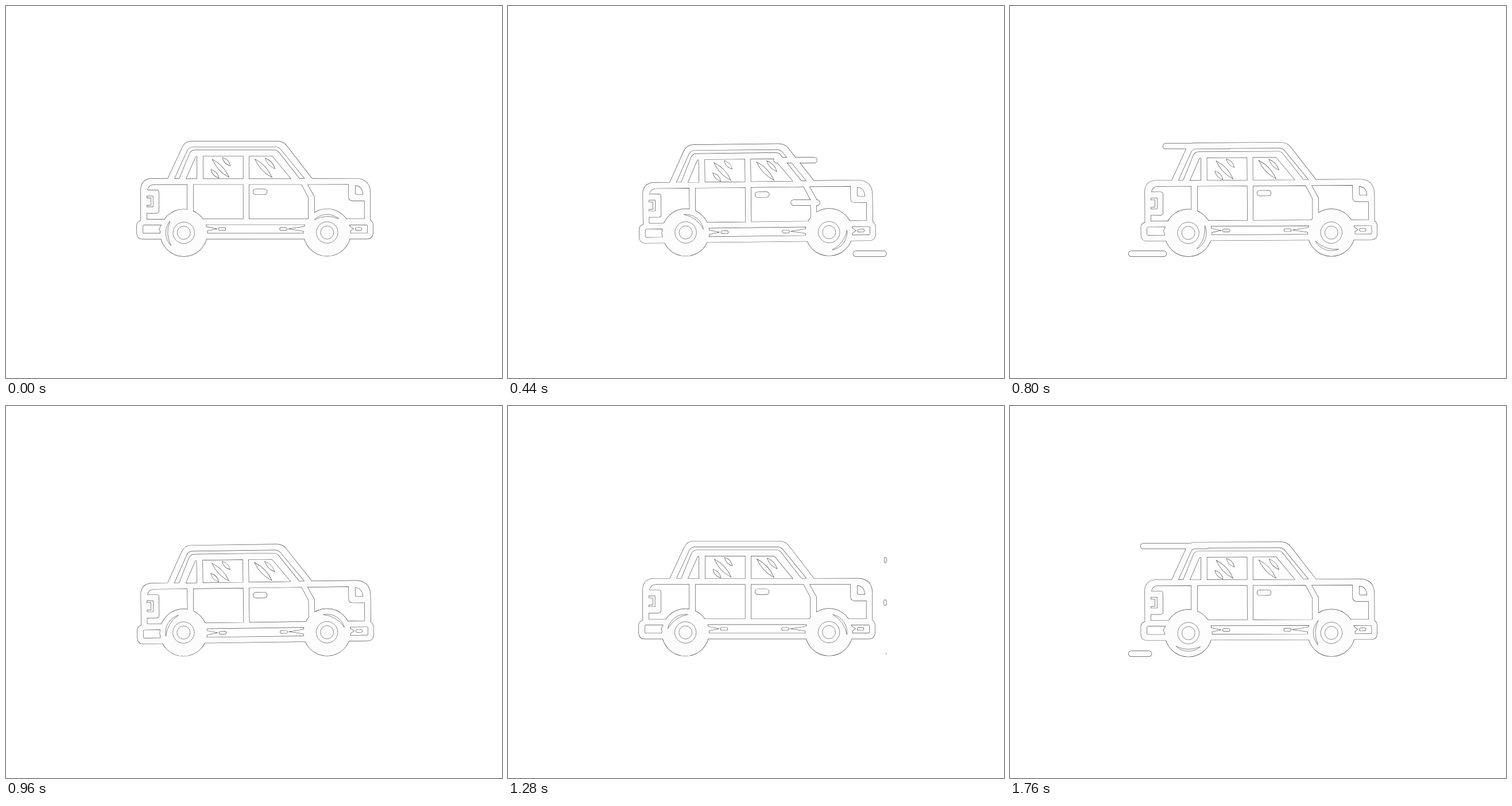
These frames come from a looping animation (864x648 px, 1800 ms). An HTML page with a canvas:

```html
<!DOCTYPE html>
<html lang="en">
<head>
<meta charset="utf-8">
<title>Driving car</title>
<style>
html, body { margin: 0; width: 100%; height: 100%; overflow: hidden; background: #fff; }
canvas { display: block; }
</style>
</head>
<body>
<canvas id="stage" width="864" height="648"></canvas>
<script>
const ctx = document.getElementById('stage').getContext('2d');
const LOOP = 1800, STEP = 40, PASS = 940;
const INK = '#484848', FILL = '#fcfcfc', PAPER = '#fff', EDGE = 0.65;
const LEFT = 206.5, RIGHT = 659;
const TAU = Math.PI * 2;

// The silhouette, then its openings; details inside an opening are solid again (even-odd).
const outline = 'M323 235H472Q483 235 489 243L533 300H610Q634 301 634.5 325V373Q639 375 639 381V396Q638 405 629 405H238Q229 405 228 396V381Q228 375 235 373V318Q236 301 254 300H282L307 246Q312 235 323 235Z';
const openings = [
  'M293 300L315 252Q318 244.500 326 244.500H469Q475 244.500 479 249L520.500 300H511L475 254Q472 250.500 467 250.500H329Q323 250.500 320 256L302 300Z',
  'M313 300.500L330 262Q333 259 333 263V300.500Z',
  'M343 260.500H413.500V300.500H343Z',
  'M423 260.500H464L497 300.500H423Z',
  'M246 320Q248 310 258 310H316V371H245V360H262Q266 360 266 356V324Q266 320 262 320Z',
  'M245 330H256.500V349.500H245V346H252V334H245Z',
  'M326 310H413.500V370.500H326Z',
  'M423 310H515L527 333V370.500H423Z',
  'M525 310H597V332Q597 338.500 604 338.500H624.500V370.500H537V332Z',
  'M608 312Q621 312 622 328H611Q608 328 608 325Z',
  'M240 380.500H271L267 388L271 395.500H240Q238 395.500 238 393V383Q238 380.500 240 380.500Z',
  'M598 380.500H628Q630 380.500 630 383V393Q630 395.500 628 395.500H598Z',
  'M340 380H527V395.500H340Z'
];
const spikes = 'M342 382.500L366 387.500L342 392.500ZM526 382.500L494 387.500L526 392.500ZM598.500 383L605 387.500L598.500 392Z';

const body = new Path2D(outline + openings.join('') + spikes);
const pills = [[430.5, 318.5, 24, 9], [370.5, 385.5, 12, 4.4], [477, 385.5, 12, 4.4], [608.5, 385.5, 11, 4.4]];
for (const [x, y, w, h] of pills) body.roundRect(x, y, w, h, h / 2);

// Lens-shaped reflections: centre, half length, half width.
const glints = [[374, 282, 20.5, 3.6], [384, 270.5, 9.5, 2.8], [364, 291.5, 9.5, 2.8], [448.5, 282, 21, 3.6], [460, 273.5, 12, 2.8]];
for (const [x, y, a, b] of glints) {
  const lens = new Path2D(`M${-a} 0Q0 ${-2 * b} ${a} 0Q0 ${2 * b} ${-a} 0Z`);
  body.addPath(lens, new DOMMatrix().translate(x, y).rotate(47));
}

const ease = (t, start, span) => {
  const p = Math.min(1, Math.max(0, (t - start) / span));
  return (1 - Math.cos(Math.PI * p)) / 2;
};
const across = p => RIGHT - (RIGHT - LEFT) * p;

// Each streak gives its front and back end at a time within the second pass.
const streaks = [
  { y: 244, ends: t => slide(t, 1539.5, 1.95, 119) },
  { y: 268.5, ends: t => slide(t, 1279, 1.925, 75) },
  { y: 342.5, ends: t => slide(t, 1278.5, 1.62, 50) },
  { y: 431.5, ends: t => [across(ease(t, 1273, 460)), across(ease(t, 1475, 353))] }
];
function slide(t, start, speed, length) {
  const front = 657.5 - (t - start) * speed;
  return [front, front + length];
}

function addStreaks(path, t) {
  for (const { y, ends } of streaks) {
    const [a, b] = ends(t).map(x => Math.min(RIGHT, Math.max(LEFT, x)));
    const w = b - a, h = Math.min(9, w * 2.8);
    if (w > 0.1) path.roundRect(a, y - h / 2, w, h, Math.min(w, h) / 2);
  }
}

function disc(x, y, r) {
  const path = new Path2D();
  path.arc(x, y, r, 0, TAU);
  return path;
}

function paint(path, color) {
  ctx.fillStyle = color;
  ctx.fill(path, 'evenodd');
}

function edge(path, width) {
  ctx.strokeStyle = INK;
  ctx.lineWidth = width;
  ctx.stroke(path);
}

function drawRim(x, y, angle) {
  const r = 31.5, half = 0.75, end = angle - half;
  const shine = new Path2D();
  shine.arc(x, y, r, end, angle + half);
  shine.quadraticCurveTo(x + 33 * Math.cos(angle), y + 33 * Math.sin(angle),
    x + r * Math.cos(end), y + r * Math.sin(end));
  const parts = [[shine, PAPER], [disc(x, y, 18.7), PAPER], [disc(x, y, 11.5), FILL]];
  for (const [path, color] of parts) {
    paint(path, color);
    edge(path, EDGE);
  }
}

function draw(now) {
  let t = Math.floor((now % LOOP) / STEP) * STEP;
  const first = t < STEP;
  if (first) t += 32; // the loop restarts slightly ahead

  const bob = (1 - Math.cos(TAU * (t - 65) / 600)) / 2;
  const pose = new DOMMatrix()
    .translate(400, 315.5 + 6.5 * bob)
    .rotate(-0.78 * bob)
    .translate(-400, -315);
  const car = new Path2D();
  car.addPath(body, pose);

  const spin = (139 + 1.2 * t) * Math.PI / 180;
  const dx = 0.9 * Math.cos(spin - 1.2), dy = 0.7 * Math.sin(spin);
  const wheels = [[310 + dx, 395 + dy, spin], [559.5 + dx / 2, 394.5 + dy, spin + Math.PI / 2]];

  const lines = new Path2D();
  addStreaks(lines, t);
  addStreaks(lines, t + PASS);
  if (first) addStreaks(lines, t + LOOP);

  // Inked shapes first, then all fills, so that only the joint outline stays.
  const shapes = [car, ...wheels.map(([x, y]) => disc(x, y, 41)), lines];
  ctx.fillStyle = PAPER;
  ctx.fillRect(0, 0, 864, 648);
  for (const shape of shapes) edge(shape, EDGE * 2);
  for (const shape of shapes) paint(shape, FILL);
  for (const wheel of wheels) drawRim(...wheel);
}

const begin = performance.now();
function tick() {
  draw(performance.now() - begin);
  requestAnimationFrame(tick);
}
tick();
</script>
</body>
</html>
```
